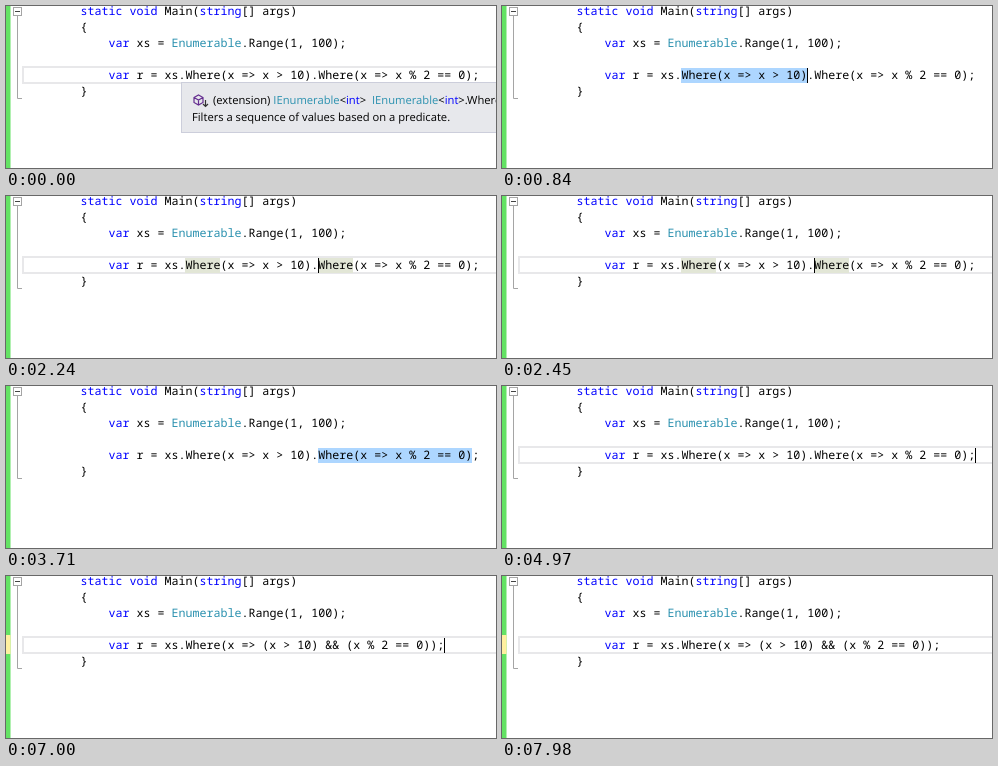
Write an HTML page that moves like this. It is 490x162 px and loops after 8000 ms.

```html
<!DOCTYPE html>
<html lang="en">
<head>
<meta charset="utf-8">
<title>Merge Where filters</title>
<style>
  html, body { margin: 0; width: 100%; height: 100%; overflow: hidden; background: #fff; }
  svg { display: block; width: 490px; height: 162px; }
  text { white-space: pre; text-rendering: geometricPrecision; }
  .code { font: 11.667px "Noto Sans Mono", monospace; }
  .diff { font: 500 8.95px "Noto Sans Mono", monospace; }
  .tip-text { font: 11.2px "Open Sans", sans-serif; }
  .menu-text { font: 11.4px "Open Sans", sans-serif; }
  .k { fill: #00f; }
  .t { fill: #2b91af; }
  .sel { fill: #add6ff; }
  .ref { fill: #e2e6d6; }
  .panel { fill: #e7e8ec; stroke: #cccedb; }
  .old { fill: #f99; }
  .new { fill: #dfe7cd; stroke: #b9c4a0; stroke-width: .7; }

  /* every part runs on the same 8 s clock */
  [id] { animation: 8s step-end infinite; }
  #line { animation-name: line; }
  #refs { animation-name: refs; }
  #sel1 { animation-name: sel1; }
  #sel2 { animation-name: sel2; }
  #before { animation-name: before; }
  #after, #unsaved { animation-name: after; }
  #caret { animation-name: caret; }
  #tipA { animation-name: tipA; }
  #tipB { animation-name: tipB; }
  #bulb, #arrow { animation-name: bulb; }
  #menu { animation-name: menu; }
  #preview { animation-name: preview; }

  @keyframes line {
    0%, 21.875%, 49%, 100% { opacity: 1; }
    3.5%, 35% { opacity: 0; }
  }
  @keyframes refs {
    0%, 36.75%, 100% { opacity: 0; }
    25.375% { opacity: 1; }
  }
  @keyframes sel1 {
    0% { width: 0; }
    3.5% { width: 0; animation-timing-function: steps(9, jump-start); }
    11.375% { width: 126px; }
    21.875%, 100% { width: 0; }
  }
  @keyframes sel2 {
    0% { width: 0; }
    35% { width: 7px; }
    36.75% { width: 7px; animation-timing-function: steps(5, jump-start); }
    41.125% { width: 154px; }
    49%, 100% { width: 0; }
  }
  @keyframes before {
    0% { opacity: 1; }
    87.5%, 100% { opacity: 0; }
  }
  @keyframes after {
    0% { opacity: 0; }
    87.5%, 100% { opacity: 1; }
  }
  @keyframes caret {
    0% { transform: translateX(179px); opacity: 0; }
    2.625% { transform: translateX(179px); opacity: 1; }
    3.5% { transform: translateX(179px); opacity: 1; animation-timing-function: steps(9, jump-start); }
    11.375% { transform: translateX(305px); opacity: 1; }
    21.875% { transform: translateX(312px); opacity: 1; }
    35% { transform: translateX(319px); opacity: 1; }
    36.75% { transform: translateX(319px); opacity: 1; animation-timing-function: steps(5, jump-start); }
    41.125% { transform: translateX(466px); opacity: 1; }
    44.625% { transform: translateX(466px); opacity: 0; }
    49%, 62.125% { transform: translateX(473px); opacity: 1; }
    56%, 63.875% { transform: translateX(473px); opacity: 0; }
    87.5%, 97.125% { transform: translateX(438px); opacity: 1; }
    93.625%, 99.75%, 100% { transform: translateX(438px); opacity: 0; }
  }
  @keyframes tipA {
    0% { opacity: 1; }
    2.625%, 100% { opacity: 0; }
  }
  @keyframes tipB {
    0%, 18.375%, 34.125%, 100% { opacity: 0; }
    14.875%, 31.5% { opacity: 1; }
  }
  @keyframes bulb {
    0%, 87.5%, 100% { opacity: 0; }
    63.875% { opacity: 1; }
  }
  @keyframes menu {
    0%, 87.5%, 100% { opacity: 0; }
    64.75% { opacity: 1; }
  }
  @keyframes preview {
    0%, 87.5%, 100% { opacity: 0; }
    67.375% { opacity: 1; }
  }
</style>
</head>
<body>
<svg viewBox="0 0 490 162">
  <defs>
    <g id="tip">
      <rect class="panel" x="175.5" y="76.5" width="330" height="50"/>
      <g fill="none" stroke="#652d90" stroke-width="1.2">
        <path d="M188 91.5l4.5-2.5 4.5 2.5v5l-4.5 2.5-4.5-2.5zM188 91.5l4.5 2.5 4.5-2.5M192.5 94v5"/>
        <path stroke="#333" d="M199.5 94v6M197 98l2.5 2.5 2.5-2.5"/>
      </g>
      <text class="tip-text" x="207" y="98">(extension) <tspan class="t">IEnumerable</tspan>&lt;<tspan class="k">int</tspan>&gt; <tspan class="t" dx="3">IEnumerable</tspan>&lt;<tspan class="k">int</tspan>&gt;.Where</text>
      <text class="tip-text" x="186" y="115">Filters a sequence of values based on a predicate.</text>
    </g>
  </defs>

  <!-- margin -->
  <rect width="4.5" height="162" fill="#64e264"/>
  <rect id="unsaved" y="59" width="4.5" height="19" fill="#fff0a0"/>
  <g fill="none" stroke="#a5a5a5">
    <path d="M11.5 10v82.5h4.5"/>
    <rect x="7.5" y="1.5" width="8" height="8" fill="#fff"/>
    <path stroke="#444" d="M9 5.5h5"/>
  </g>

  <!-- editor -->
  <rect id="line" x="17" y="61" width="490" height="16" fill="none" stroke="#e8e8ea" stroke-width="2"/>
  <g id="refs" class="ref">
    <rect x="179" y="62" width="35" height="15"/>
    <rect x="312" y="62" width="35" height="15"/>
  </g>
  <rect id="sel1" class="sel" x="179" y="62" width="0" height="15"/>
  <rect id="sel2" class="sel" x="312" y="62" width="0" height="15"/>
  <g class="code">
    <text x="74.5" y="9"><tspan class="k">static</tspan> <tspan class="k">void</tspan> Main(<tspan class="k">string</tspan>[] args)</text>
    <text x="74.5" y="25">{</text>
    <text x="102.5" y="41"><tspan class="k">var</tspan> xs = <tspan class="t">Enumerable</tspan>.Range(1, 100);</text>
    <text id="before" x="102.5" y="73"><tspan class="k">var</tspan> r = xs.Where(x =&gt; x &gt; 10).Where(x =&gt; x % 2 == 0);</text>
    <text id="after" x="102.5" y="73"><tspan class="k">var</tspan> r = xs.Where(x =&gt; (x &gt; 10) &amp;&amp; (x % 2 == 0));</text>
    <text x="74.5" y="89">}</text>
  </g>
  <rect id="caret" y="62" width="1" height="15"/>

  <g id="tipA"><use href="#tip"/></g>
  <g id="tipB"><use href="#tip" x="133"/></g>

  <!-- quick actions -->
  <g id="bulb">
    <rect x="-4.5" y="58.5" width="14" height="20" fill="#e4e6f8" stroke="#b4bbdc"/>
    <path d="M-2 67.500h6l-3 3.500z" fill="#5c3a78"/>
  </g>
  <g id="menu" class="menu-text" fill="#1b2238">
    <rect x="-1" y="80.5" width="181.5" height="77" fill="#e9eefb" stroke="#9fb0d0"/>
    <rect x="-1" y="82.5" width="180.5" height="23" fill="#fdf4bf" stroke="#e5c365"/>
    <path d="M0 131.5h180" stroke="#c3cde4"/>
    <text x="13" y="99">Merge Where filters</text>
    <text x="13" y="124">Unchain calls</text>
    <text x="13" y="149">Specify type explicitly</text>
  </g>
  <g id="preview" class="diff">
    <rect x="181.5" y="83.5" width="320" height="90" fill="#fff" stroke="#b4bfd6"/>
    <rect x="185" y="111" width="305" height="13" fill="#fcc"/>
    <rect x="185" y="124" width="305" height="13" fill="#ebf1dd"/>
    <rect class="old" x="357" y="111" width="48" height="13"/>
    <rect class="old" x="410" y="111" width="11" height="13"/>
    <rect class="old" x="479" y="111" width="11" height="13"/>
    <rect class="new" x="324.5" y="124.5" width="43" height="12"/>
    <rect class="new" x="372.5" y="124.5" width="11" height="12"/>
    <rect class="new" x="388.5" y="124.5" width="75" height="12"/>
    <text x="185" y="94">...</text>
    <text x="206" y="121"><tspan class="k">var</tspan> r = xs.Where(x =&gt; x &gt; 10).Where(x =&gt; x % 2 == 0);</text>
    <text x="206" y="133"><tspan class="k">var</tspan> r = xs.Where(x =&gt; (x &gt; 10) &amp;&amp; (x % 2 == 0));</text>
    <text x="185" y="147">}</text>
    <text x="185" y="159">...</text>
  </g>
  <path id="arrow" d="M478.5 72.5v15l3.500-3.200 2.700 5.700 2.400-1.100-2.700-5.600h4.900z" fill="#fff" stroke="#3d2a5c"/>
</svg>
</body>
</html>
```
